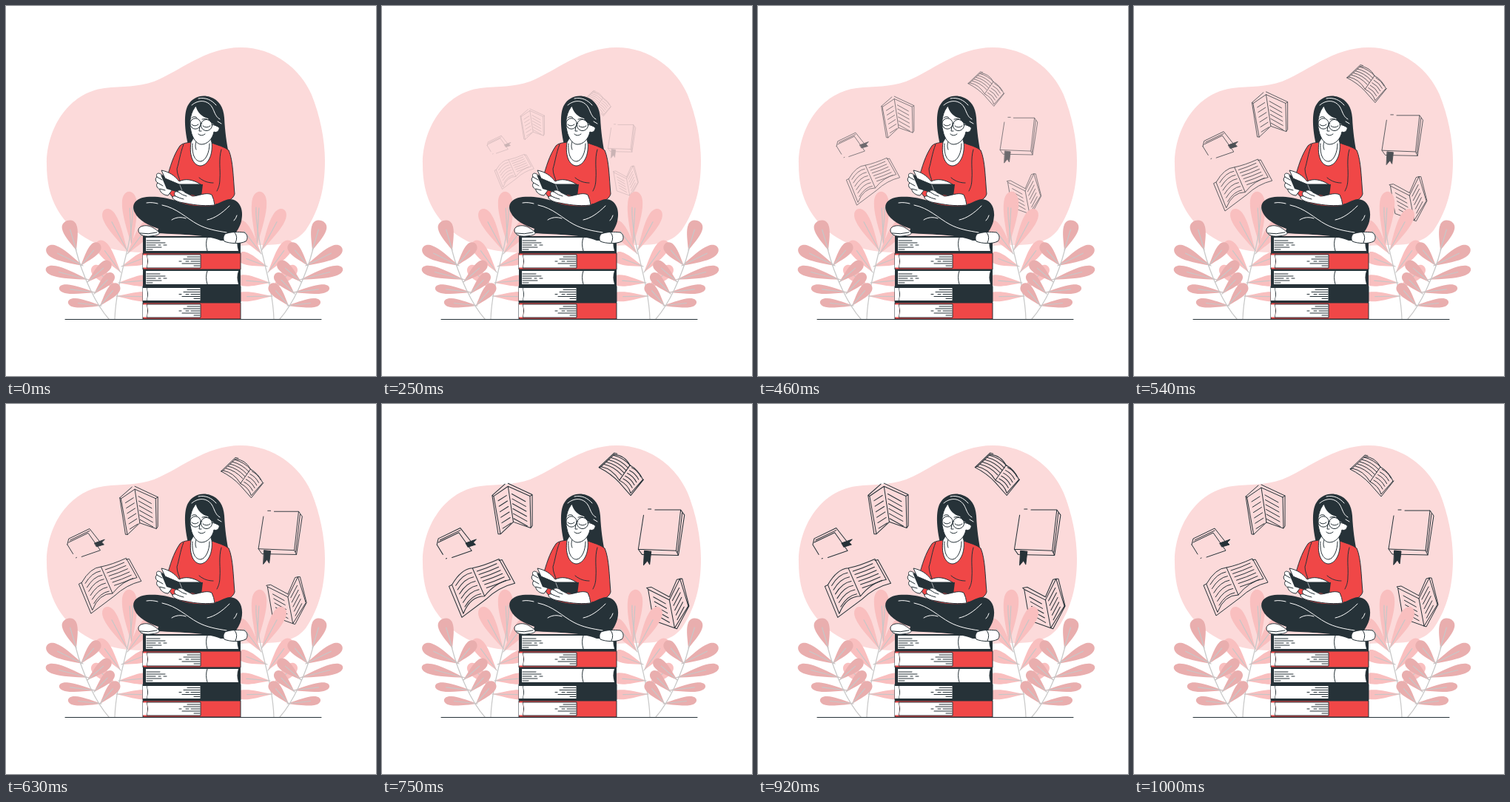
An HTML page for the animation above (1040 ms loop, 500x500 px).

```html
<!DOCTYPE html>
<html lang="en">
<head>
<meta charset="utf-8">
<title>Reading on a stack of books</title>
<style>
html, body { margin: 0; width: 100%; height: 100%; overflow: hidden; background: #fff; }
svg { display: block; width: 100vw; height: 100vh; }
.line { fill: none; stroke: #263238; stroke-width: 1; stroke-linecap: round; stroke-linejoin: round; }
.white { fill: #fff; stroke: #263238; stroke-linejoin: round; }
.red { fill: #f04747; stroke: #263238; stroke-linejoin: round; }
.dark { fill: #263238; }
.shine { fill: none; stroke: #fff; stroke-linecap: round; }
.stem { fill: none; stroke: #c7c7c7; stroke-width: 1.2; stroke-linecap: round; }
</style>
</head>
<body>
<svg viewBox="0 0 500 500">
  <path fill="#fcdada" d="M55 213C55 165 85 117 133 111C158 108 178 110 200 102C235 88 270 56 317 56C362 56 398 85 413 120C424 147 431 180 431 209C431 245 424 275 405 303C390 322 365 323 345 323C290 323 250 333 185 333C130 333 90 310 70 276C58 255 55 235 55 213Z"/>

  <g id="flying" class="line" opacity="0">
    <!-- small closed book -->
    <path d="M78 190L80 182 109 168 124 187M82 184L109 171M80 187L107 174 124 198 98 207M91 208l-1 .5M86 203L78 190"/>
    <path class="dark" d="M116 188L130 183 126 187 129 190 119 193Z"/>
    <!-- large open book -->
    <path d="M98 243L94 245 111 286 143 262Q160 246 181 241L164 210 160 211M98 243Q110 222 125 221Q140 218 160 209L175 236Q155 240 141 258Q122 258 113 281ZM125 221L141 258"/>
    <!-- upright open book -->
    <path d="M153 126L172 113 179 160 162 176ZM172 113L201 126 202 168 179 160M153 126L151 125 168 110M172 109L204 124 204 165 202 168M201 126L204 124M162 176L159 176 151 125"/>
    <!-- small open book -->
    <path d="M295 87L312 71Q326 72 333 85L319 105Q310 90 295 87L292 88 312 69 316 70M333 85Q344 91 350 104L334 122Q331 111 319 105M292 88Q308 96 319 108L334 125 351 104"/>
    <!-- large closed book -->
    <path d="M351 151L344 196 394 198 400 144 366 144M361 143h-4M400 144L405 151 397 204 349 203 344 196M402 148L396 200M394 198L397 204"/>
    <path class="dark" d="M352 198L361 199 359 216 356 211 351 217Z"/>
    <!-- lower open book -->
    <path d="M357 249L385 263 392 300 364 290ZM385 263L399 235 410 271 392 300M357 249L355 247 361 246 385 259M399 235L395 236 385 259M399 235L402 235 411 271 395 301 392 300"/>
  </g>

  <g id="plants"></g>
  <path class="line" d="M80 423.5H426"/>
  <g id="stack"></g>

  <g id="reader">
    <path class="dark" d="M247 191C241 168 240 144 246 134C252 123 265 119 276 123C288 127 294 137 295 151C296 171 298 184 301 200L280 197 250 196Z"/>
    <!-- torso and sleeves -->
    <path class="red" d="M250 184C242 185 238 186 235 189C226 202 222 217 217 234L214 244 228 262 236 276 284 276 283 268C296 266 307 262 309 254C307 233 307 209 301 195C295 190 286 188 278 185Z"/>
    <path class="white" d="M250 184C247 204 254 216 263 216C273 215 280 201 278 184L275 174 256 174Z"/>
    <path class="line" d="M252 186C251 202 256 210 263 210C270 209 275 198 275 186M258 181C256 185 255 190 257 194M240 187C235 200 234 211 231 220C231 227 234 232 235 236M261 232C268 238 275 239 280 239M291 194C287 207 290 222 289 233C289 242 287 246 285 250"/>
    <!-- face -->
    <path class="white" d="M258 134C249 142 247 158 250 169C252 179 258 187 264 187C272 187 279 180 281 170C285 172 289 168 288 164L282 160Z"/>
    <path class="dark" d="M256 133C258 145 266 150 273 152C276 158 283 162 288 164C295 163 295 153 293 146C288 130 273 125 256 133Z"/>
    <path class="shine" d="M251 134C260 126 272 127 278 136C282 142 282 149 289 153M260 125C270 123 278 127 284 134M286 156l5 3"/>
    <g class="line">
      <circle cx="256" cy="159" r="7.2"/><circle cx="271" cy="161" r="7.6"/>
      <path d="M263 159Q264 157 265 159M278 160L285 162M251 160Q255 164 260 160M266 162Q271 166 276 162M251 151Q255 148 258 151M265 153Q270 151 274 154M262 162L261 169 264 169M260 173Q264 177 269 173"/>
    </g>
    <!-- legs and feet -->
    <path class="dark" d="M190 258C174 260 169 269 174 279C179 290 194 297 206 301L204 307C240 309 270 309 290 317C302 318 314 306 318 291C322 274 315 261 302 261C294 262 288 267 279 270C262 271 245 270 229 263C215 258 201 257 190 258Z"/>
    <path class="shine" d="M190 266C196 265 201 266 205 267M211 269C231 273 244 287 259 295C272 302 286 304 298 306M224 289C230 285 237 285 243 287M272 289C282 287 292 280 302 270M308 290Q311 287 312 283"/>
    <path class="white" d="M179 304C178 298 186 296 192 297C198 298 204 303 207 306C208 309 203 310 195 311C186 312 180 309 179 304ZM296 308C304 305 314 305 322 306C327 309 327 315 324 318C316 322 302 321 295 318C293 314 294 311 296 308Z"/>
    <path class="line" d="M181 307Q192 309 204 306M309 306Q314 312 310 320"/>
    <!-- held book and hands -->
    <path class="white" d="M212 229C206 224 202 226 204 231C201 233 202 237 205 239C202 242 204 246 208 248C208 252 214 256 219 256L225 248Z"/>
    <path class="line" d="M204 231l7 4M205 239l7 4M208 247l7 2"/>
    <path class="dark" d="M209 228L234 239 266 241 264 257 239 254 217 247Z"/>
    <path class="white" d="M210 222C220 224 228 229 234 237C242 233 252 234 263 241L234 241 215 233Z"/>
    <path class="shine" d="M235 242L239 252" stroke-width=".6"/>
    <path class="white" d="M282 269C265 271 250 268 240 266C232 265 226 262 225 259C225 256 229 257 229 257C226 253 228 250 232 251C232 248 238 248 242 252L252 257C260 257 270 251 278 255Q281 261 282 269Z"/>
    <path class="line" d="M229 257Q235 260 240 261M232 251Q239 256 244 257"/>
  </g>
</svg>
<script>
const $ = id => document.getElementById(id);
const path = (d, attrs) => `<path d="${d}" ${attrs}/>`;

// Printed lines on the flying pages: first line, step per line, count.
const rows = (d, dx, dy, n) => Array.from({ length: n }, (_, i) =>
  path(d, `transform="translate(${i * dx} ${i * dy})"`)).join('');
$('flying').insertAdjacentHTML('beforeend',
  rows('M103 244Q112 229 124 227', 2.4, 5.6, 6) +
  rows('M131 225Q144 221 157 215', 2.5, 4.4, 6) +
  rows('M159 132L170 125', 1.2, 7.3, 6) +
  rows('M177 123L195 133', .5, 6.5, 6) +
  rows('M299 84Q312 87 322 98', 3, -3, 5) +
  rows('M324 103Q332 107 336 115', 2.8, -3.7, 5) +
  rows('M364 259L380 268', 1.3, 6.2, 5) +
  rows('M389 264L398 247', 1.6, 6.3, 5));

// Each leaf: tip x, tip y, base x, base y, width.
function leaf([x, y, bx, by, w]) {
  const len = Math.hypot(x - bx, y - by), a = Math.atan2(y - by, x - bx) * 180 / Math.PI;
  const l = k => (k * len).toFixed(1), h = k => (k * w).toFixed(1);
  return `<g transform="translate(${bx} ${by}) rotate(${a})">` +
    path(`M0 0C${l(.35)} ${h(-.3)} ${l(.6)} ${h(-.55)} ${l(.8)} ${h(-.5)}C${l(1.07)} ${h(-.45)} ${l(1.07)} ${h(.45)} ${l(.8)} ${h(.5)}C${l(.6)} ${h(.55)} ${l(.35)} ${h(.3)} 0 0`, '') +
    path(`M0 0H${l(.7)}`, 'class="stem"') + '</g>';
}
const plant = (color, stem, leaves) =>
  `<g fill="${color}">${leaves.map(leaf).join('')}${path(stem, 'class="stem"')}</g>`;

const side =
  plant('#f9bfbf', 'M147 423C148 390 158 355 165 325C168 310 172 290 171 272', [
    [166, 251, 170, 325, 20], [134, 275, 164, 331, 18], [124, 318, 155, 360, 17],
    [117, 352, 151, 384, 16], [197, 291, 164, 335, 18], [196, 337, 156, 352, 16],
    [198, 370, 152, 374, 15], [198, 393, 149, 392, 13]
  ]) +
  plant('#e9aeae', 'M139 423C122 404 104 367 94 328', [
    [83, 290, 95, 330, 20], [55, 327, 104, 351, 17], [54, 355, 112, 370, 14],
    [72, 381, 121, 387, 12], [84, 400, 129, 405, 12], [126, 321, 101, 351, 15],
    [141, 346, 110, 373, 15], [145, 362, 119, 389, 14], [152, 376, 127, 405, 15]
  ]);
$('plants').innerHTML = side + `<g transform="translate(509 0) scale(-1 1)">${side}</g>`;

// Books in the stack: a white-spined one, and one showing its pages beside a coloured spine.
const whiteBook = y =>
  path(`M185 ${y}H317V${y + 23}H185Z`, 'class="dark"') +
  path(`M189 ${y + 2}H314Q311 ${y + 10} 314 ${y + 20}H189Z`, 'fill="#fff"') +
  path(`M272 ${y + 2}Q269 ${y + 10} 272 ${y + 20}M190 ${y + 6}h18M190 ${y + 9}h25M190 ${y + 12}h12M206 ${y + 12}h3M213 ${y + 12}h4M190 ${y + 15}h20M190 ${y + 18}h8`, 'class="line"');
const spineBook = (y, color) =>
  path(`M185 ${y}H317V${y + 22}H185Z`, `fill="${color}" stroke="#263238"`) +
  path(`M190 ${y + 2}H263V${y + 20}H190Q193 ${y + 11} 190 ${y + 2}Z`, 'class="white"') +
  path(`M185 ${y + 2.5}H190Q192 ${y + 11} 190 ${y + 19.5}H185Z`, 'fill="#fff"') +
  path(`M245 ${y + 5}h17M240 ${y + 8}h22M250 ${y + 11}h12M243 ${y + 11}h4M234 ${y + 11}h3M238 ${y + 14}h24M254 ${y + 17}h8`, 'class="line"');
$('stack').innerHTML = whiteBook(311) + spineBook(334, '#f04747') + whiteBook(356) +
  spineBook(378.5, '#263238') + spineBook(401, '#f04747');

// cubic-bezier(.36, -.01, .5, 1.38)
function ease(x) {
  const curve = (a, b, t) => 3 * (1 - t) ** 2 * t * a + 3 * (1 - t) * t * t * b + t ** 3;
  let lo = 0, hi = 1;
  for (let i = 0; i < 30; i++) {
    const mid = (lo + hi) / 2;
    if (curve(.36, .5, mid) < x) lo = mid; else hi = mid;
  }
  return curve(-.01, 1.38, hi);
}

const LOOP = 1040, FPS = 24;
function draw() {
  const t = performance.now() % LOOP;
  const step = Math.min(FPS, Math.floor(t * FPS / 1000 + .1));
  const p = step < 2 ? 0 : ease(step / FPS);
  $('flying').setAttribute('opacity', Math.max(0, Math.min(1, p)));
  $('flying').setAttribute('transform', `translate(244 186.5) scale(${.5 + p / 2}) translate(-244 -186.5)`);
  requestAnimationFrame(draw);
}
draw();
</script>
</body>
</html>
```
